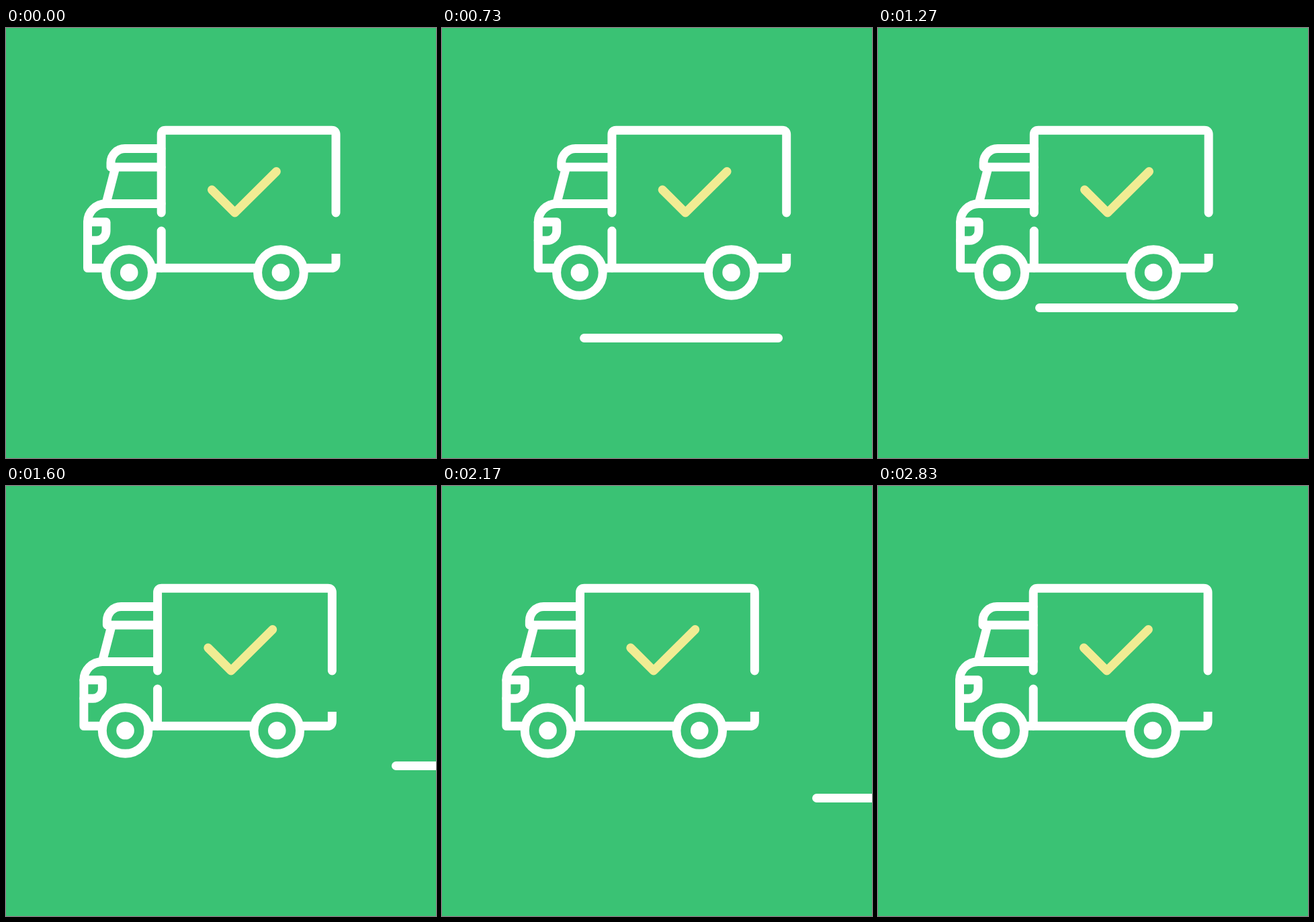
Write an HTML page that moves like this. It is 640 px wide and 640 px high and loops after 2930 ms.

```html
<!DOCTYPE html>
<html lang="en">
<head>
<meta charset="utf-8">
<title>Delivery truck</title>
<style>
  html, body { margin: 0; width: 100%; height: 100%; overflow: hidden; background: #3ac274; }
  svg { display: block; width: 100vw; height: 100vh; }
</style>
</head>
<body>
<svg viewBox="0 0 640 640" fill="none" stroke="#fff" stroke-width="13" stroke-linecap="round" stroke-linejoin="round">
  <g id="roads">
    <path d="M6.5 461.5h289"/>
    <path d="M6.5 416.5h289"/>
    <path d="M6.5 464.5h289"/>
  </g>
  <g id="truck">
    <!-- cargo box -->
    <path d="M231.2 275V158.5q0-6.3 6.3-6.3H484.7q6.3 0 6.3 6.3V275M231.2 302V357"/>
    <path stroke-linecap="butt" d="M183 357.3H484q7 0 7-7V336"/>
    <!-- cab -->
    <path d="M183 357.3H121.5V289A27.5 27.5 0 0 1 149 261.4H231"/>
    <path d="M121.5 288.8H149V302.3A14 14 0 0 1 135 316.3H121.5"/>
    <path d="M231 179.6H177A21 21 0 0 0 156 200.6V206.9H231M163 207L149 261"/>
    <!-- wheels -->
    <g fill="#3ac274">
      <circle cx="183.2" cy="364" r="34.3"/>
      <circle cx="408.9" cy="364" r="34.3"/>
    </g>
    <g fill="#fff" stroke="none">
      <circle cx="183.2" cy="364" r="13.3"/>
      <circle cx="408.9" cy="364" r="13.3"/>
    </g>
    <path stroke="#f1ec93" d="M306.4 240.8L340.6 275L402.4 213.6"/>
  </g>
</svg>
<script>
  const LOOP = 2930;
  const truck = document.getElementById('truck');
  const roads = [...document.getElementById('roads').children];

  // [time in ms, horizontal offset]
  const sway = [[0, 0], [680, 22], [1370, 0], [2120, -26], [2820, 0], [LOOP, 0]];

  // Each road line passes `x` at `time`, moving at `speed` px/ms.
  const passes = [
    { from: 250, to: 1130, time: 730, x: 204, speed: 1.072 },
    { from: 1130, to: 1670, time: 1270, x: 233, speed: 1.03 },
    { from: 1630, to: 2290, time: 1870, x: 294, speed: 0.854 },
  ];

  const ease = p => (1 - Math.cos(Math.PI * p)) / 2;

  function swayAt(t) {
    const i = sway.findIndex(([time]) => t < time);
    const [t0, x0] = sway[i - 1];
    const [t1, x1] = sway[i];
    return x0 + (x1 - x0) * ease((t - t0) / (t1 - t0));
  }

  function draw(t) {
    truck.setAttribute('transform', `translate(${swayAt(t)} 0)`);
    passes.forEach(({ from, to, time, x, speed }, i) => {
      const visible = t >= from && t < to;
      roads[i].setAttribute('visibility', visible ? 'visible' : 'hidden');
      roads[i].setAttribute('transform', `translate(${x + speed * (t - time)} 0)`);
    });
  }

  const start = performance.now();
  function tick() {
    draw((performance.now() - start) % LOOP);
    requestAnimationFrame(tick);
  }
  tick();
</script>
</body>
</html>
```
